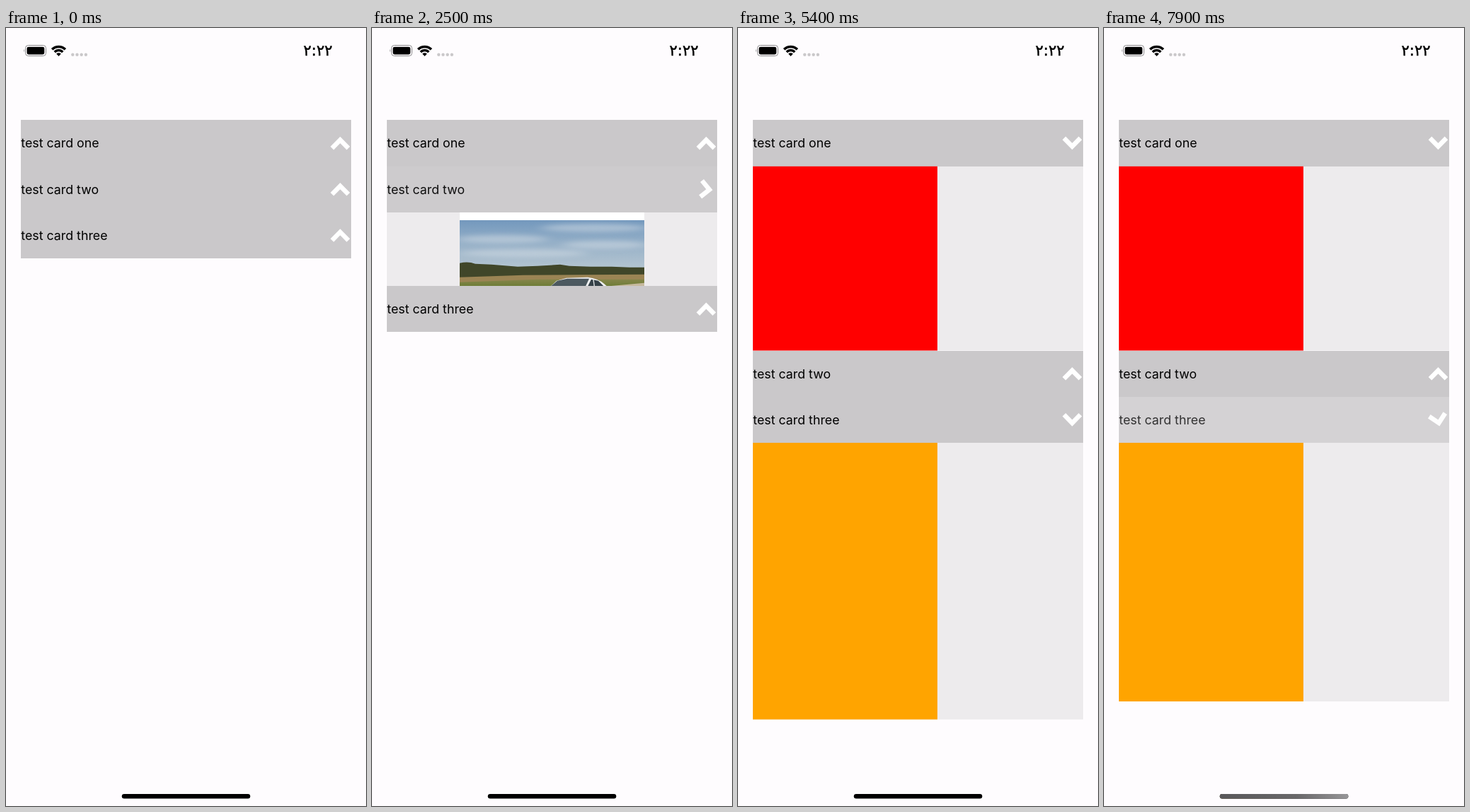
Write an HTML page that moves like this. It is 509x1101 px and loops after 8 s.

```html
<!DOCTYPE html>
<html lang="en">
<head>
<meta charset="utf-8">
<title>Accordion cards</title>
<style>
  html, body { margin: 0; width: 100%; height: 100%; overflow: hidden; background: #fefcfe; }
  svg { display: block; }
  rect { shape-rendering: crispEdges; }
  .smooth { shape-rendering: auto; }
  .label { font: 17.8px Inter, Roboto, sans-serif; }
  .clock { font: 21px "DejaVu Sans", sans-serif; text-anchor: middle; stroke: #000; stroke-width: .5; }
  .chevron { fill: none; stroke: #fff; stroke-width: 6.5; }
</style>
</head>
<body>
<svg id="stage" width="509" height="1101" viewBox="0 0 509 1101">
  <defs>
    <linearGradient id="sky" x2="0" y2="1">
      <stop offset="0" stop-color="#7398bd"/>
      <stop offset=".5" stop-color="#9ab3c9"/>
      <stop offset="1" stop-color="#b9c8d2"/>
    </linearGradient>
    <linearGradient id="grass" x2="0" y2="1">
      <stop offset="0" stop-color="#85854a"/>
      <stop offset=".4" stop-color="#60782c"/>
      <stop offset="1" stop-color="#4d6427"/>
    </linearGradient>
    <linearGradient id="road" x2="0" y2="1">
      <stop offset="0" stop-color="#bba58c"/>
      <stop offset="1" stop-color="#a78a70"/>
    </linearGradient>
    <linearGradient id="barOpen">
      <stop offset="0" stop-color="#6e5f3c"/>
      <stop offset=".4" stop-color="#4a4030"/>
      <stop offset=".66" stop-color="#454446"/>
      <stop offset="1" stop-color="#6c6b6d"/>
    </linearGradient>
    <linearGradient id="barGrey">
      <stop offset="0" stop-color="#59585a"/>
      <stop offset=".6" stop-color="#69686a"/>
      <stop offset="1" stop-color="#979698"/>
    </linearGradient>
    <filter id="soft" x="-30%" y="-30%" width="160%" height="160%">
      <feGaussianBlur stdDeviation="9 3"/>
    </filter>
    <clipPath id="frame"><rect y="11" width="261" height="174"/></clipPath>

    <g id="photo">
      <rect width="261" height="195.7" fill="#fff"/>
      <g clip-path="url(#frame)">
        <rect y="11" width="261" height="75" fill="url(#sky)"/>
        <g fill="#d3dce4" opacity=".5" filter="url(#soft)">
          <ellipse cx="190" cy="22" rx="75" ry="6"/>
          <ellipse cx="60" cy="38" rx="65" ry="6"/>
          <ellipse cx="205" cy="46" rx="60" ry="6"/>
          <ellipse cx="90" cy="58" rx="90" ry="6"/>
        </g>
        <path d="M0 72Q12 69 22 73L45 74 82 77 110 76 142 74 155 76 185 77 215 77 240 78 261 78V99H0Z" fill="#404629"/>
        <path d="M0 92 90 89 261 88V106H0Z" fill="#9b8454"/>
        <path d="M0 99 110 95 261 95V105L105 124 0 133Z" fill="url(#grass)"/>
        <path d="M0 131 105 118 261 103V185H0Z" fill="url(#road)"/>
        <path d="M0 127 105 114 261 100V104L105 120 0 134Z" fill="#c6b99e"/>
        <path d="M0 144 103 128" stroke="#e4dccf" stroke-width="1.5"/>
        <path d="M207 143 250 125 254 128 218 145Z" fill="#e8e4df"/>
        <path d="M120 185 185 155 261 130V140L198 168 155 185Z" fill="#6a5a50" opacity=".55" filter="url(#soft)"/>
        <path d="M101 143 140 155 207 138 214 134 209 146 158 157 110 149Z" fill="#4d443f"/>
        <path d="M102 124 107 116 126 107 137 97 151 93 181 92Q196 94 204 101L212 108 214 125 210 135 180 145 167 153 136 153 104 144 101 135Z" fill="#eeeff0"/>
        <path d="M126 107 138 97 152 94 183 94 176 109Q149 105 126 107Z" fill="#4c5960"/>
        <path d="M179 109 186 95 196 97 205 106 202 109Z" fill="#344047"/>
        <path d="M189 95 191 109" stroke="#d9dddf" stroke-width="1.4"/>
        <path d="M107 116 127 111 174 112 162 120 138 121 108 118Z" fill="#fafafa"/>
        <path d="M108 120 142 124 145 132 136 137 112 131Z" fill="#303437"/>
        <path d="M104 140 138 146 164 142 163 148 136 150 106 144Z" fill="#5c5f60"/>
        <path d="M146 122 167 118 162 127 147 129Z" fill="#a9b7be"/>
        <ellipse cx="174" cy="137" rx="7" ry="15" fill="#25282a"/>
        <ellipse cx="175" cy="137" rx="4.5" ry="10.5" fill="#777d80"/>
        <ellipse cx="209" cy="126" rx="5" ry="12" fill="#25282a"/>
        <ellipse cx="209.5" cy="126" rx="3" ry="8" fill="#70777a"/>
        <circle cx="125" cy="128" r="3.5" fill="#b7bbbd"/>
      </g>
    </g>
  </defs>

  <rect width="509" height="1101" fill="#fefcfe"/>

  <rect class="smooth" x="27.5" y="24.5" width="29" height="15" rx="4" fill="none" stroke="#8b8a8c"/>
  <rect class="smooth" x="29.5" y="26.7" width="24.8" height="10.8" rx="2.4"/>
  <path d="M25.8 29.7Q24 32 25.8 34.3Z" fill="#8b8a8c"/>
  <g fill="none" stroke="#000" stroke-width="3.5">
    <path d="M65.1 30.3A13.3 13.3 0 0 1 83.9 30.3"/>
    <path d="M68.7 34A8.2 8.2 0 0 1 80.3 34"/>
  </g>
  <path d="M74.5 40 71.2 36.6A4.7 4.7 0 0 1 77.8 36.6Z"/>
  <g fill="#cac8ca">
    <circle cx="94.3" cy="37.7" r="2.2"/><circle cx="100.5" cy="37.7" r="2.2"/>
    <circle cx="106.7" cy="37.7" r="2.2"/><circle cx="112.9" cy="37.7" r="2.2"/>
  </g>
  <text class="clock" x="441" y="39">٢:٢٢</text>

  <g id="list"></g>
  <g id="bars"></g>
</svg>

<script>
const LOOP = 8000, TICK = 100, TOP = 130.4, HEAD = 65.2, LEFT = 20.9, WIDTH = 467.2;

const block = color => `<rect class="smooth" width="261" height="400" fill="${color}"/>`;
const cards = [
  { title: 'test card one', full: 261, body: block('#f00') },
  { title: 'test card two', full: 195.7, body: '<use href="#photo" x="103.1"/>' },
  { title: 'test card three', full: 391.4, body: block('#ffa400') }
];

// Taps: [press time, card, delay until release]; each one toggles its card.
const taps = [
  [500, 2, 145], [1400, 2, 31], [2300, 1, 45], [3000, 1, 41.5], [3800, 0, 45],
  [5000, 2, 45], [5800, 1, 45], [7100, 1, 45], [7800, 2, 46]
];

const list = document.getElementById('list');
const barGroup = document.getElementById('bars');
barGroup.innerHTML = ['#000', 'url(#barOpen)', 'url(#barGrey)'].map(fill =>
  `<rect class="smooth" x="163.8" y="1084.1" width="181.5" height="6.5" rx="3.25" fill="${fill}"/>`).join('');
const bars = barGroup.children;

for (const card of cards) {
  const g = document.createElementNS('http://www.w3.org/2000/svg', 'g');
  g.innerHTML = `
    <g>
      <rect width="${WIDTH}" height="${HEAD}" fill="#cac8ca"/>
      <text class="label" x=".4" y="39.1">${card.title}</text>
      <path class="chevron" d="M-11.5 7.1 0-4.6 11.5 7.1"/>
    </g>
    <svg y="${HEAD}" width="${WIDTH}" height="0" overflow="hidden">
      <rect width="${WIDTH}" height="400" fill="#edebed"/>${card.body}
    </svg>`;
  list.append(g);
  [card.head, card.panel] = g.children;
  card.group = g;
  card.chevron = g.querySelector('.chevron');
}

const clamp = x => Math.min(1, Math.max(0, x));
const ease = x => (x = clamp(x), x < .5 ? 2 * x * x : 1 - 2 * (1 - x) ** 2);

function cardState(index, t) {
  let open = 0, opacity = 1;
  for (const [start, target, delay] of taps) {
    if (target !== index || t < start) continue;
    const since = t - start - delay;
    const moved = ease(since / 300);
    open = open ? 1 - moved : moved;
    opacity = 1 - .22 * (since < 0 ? .8 : 1 - ease(since / 250));
  }
  return { open, opacity };
}

function draw(t) {
  let y = TOP;
  cards.forEach((card, i) => {
    const { open, opacity } = cardState(i, t);
    const height = card.full * open;
    card.group.setAttribute('transform', `translate(${LEFT} ${y})`);
    card.head.setAttribute('opacity', opacity);
    card.panel.setAttribute('height', height);
    card.panel.style.display = height > .1 ? '' : 'none';
    card.chevron.setAttribute('transform', `translate(451.6 ${HEAD / 2}) rotate(${180 * open})`);
    y += HEAD + height;
  });
  bars[1].setAttribute('opacity', clamp((t - 5800) / 400));
  bars[2].setAttribute('opacity', clamp((t - 7100) / 400));
}

const began = performance.now();
function frame() {
  const t = (performance.now() - began) % LOOP;
  draw(Math.floor(t / TICK) * TICK);
  requestAnimationFrame(frame);
}
frame();
</script>
</body>
</html>
```
